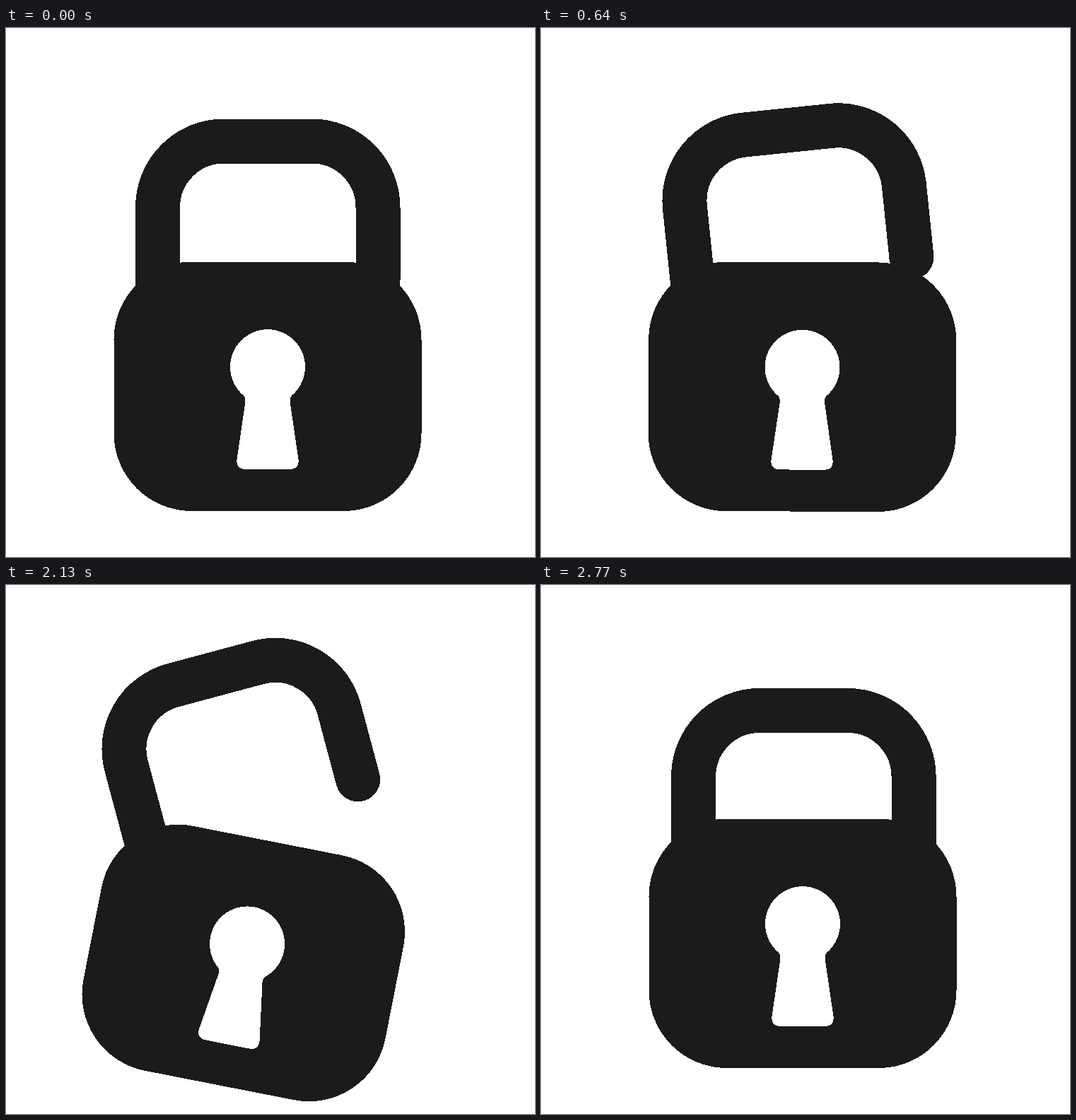
Animation of 748x748 px, one loop 2.81 s. Source, as an HTML page:

```html
<!DOCTYPE html>
<html>
<head>
<meta charset="utf-8">
<title>Padlock</title>
<style>
  html, body { margin: 0; height: 100%; overflow: hidden; background: #fff; }
  svg { display: block; width: 100%; height: 100%; shape-rendering: crispEdges; }
</style>
</head>
<body>
<svg viewBox="0 0 748 748">
  <path id="shackle" fill="none" stroke="#1b1b1b" stroke-width="63" stroke-linecap="round"
    d="M214.5 403V253.5A93.5 93.5 0 0 1 308 160H432.5A93.5 93.5 0 0 1 526 253.5V356.2"/>
  <g id="body">
    <rect x="152.5" y="330.5" width="435" height="352.5" rx="110" fill="#1b1b1b"/>
    <g fill="#fff">
      <circle cx="370" cy="479.2" r="53"/>
      <path d="M333.5 517Q339 522 338.5 528L326.5 610Q325 624 339 624H401Q415 624 413.5 610L401.5 528Q401 522 406.5 517Z"/>
    </g>
  </g>
</svg>
<script>
const LOOP = 2810, STEP = 40, CLOSE_START = 2490;
const shackle = document.getElementById('shackle');
const body = document.getElementById('body');

const progress = (t, from, to) => Math.min(1, Math.max(0, (t - from) / (to - from)));
const smooth = u => u * u * (3 - 2 * u);
const cubic = u => u < 0.5 ? 4 * u ** 3 : 1 - 4 * (1 - u) ** 3;
const pulse = u => u > 0 && u < 1 ? Math.sin(Math.PI * u) : 0;

function draw(time) {
  const origin = time < CLOSE_START ? 0 : CLOSE_START;
  const t = origin + Math.floor((time - origin) / STEP) * STEP;

  const swing = smooth(progress(t, 520, 800)) - smooth(progress(t, 2500, 2690));
  const tilt = cubic(progress(t, 600, 840)) - cubic(progress(t, 2500, 2610));
  const press = 18 * pulse(progress(t, 300, 555)) + 19.5 * pulse(progress(t, 2660, 2830));

  const x = (press ? 1.1 : 0) - 17.4 * tilt;
  const y = press - 0.8 * swing;
  shackle.setAttribute('transform', `translate(${x} ${y}) rotate(${-15 * swing} 214.5 357.5)`);
  body.setAttribute('transform', `rotate(${11.1 * tilt} 210.2 344.4)`);
}

const start = performance.now();
function frame() {
  draw((performance.now() - start) % LOOP);
  requestAnimationFrame(frame);
}
frame();
</script>
</body>
</html>
```
